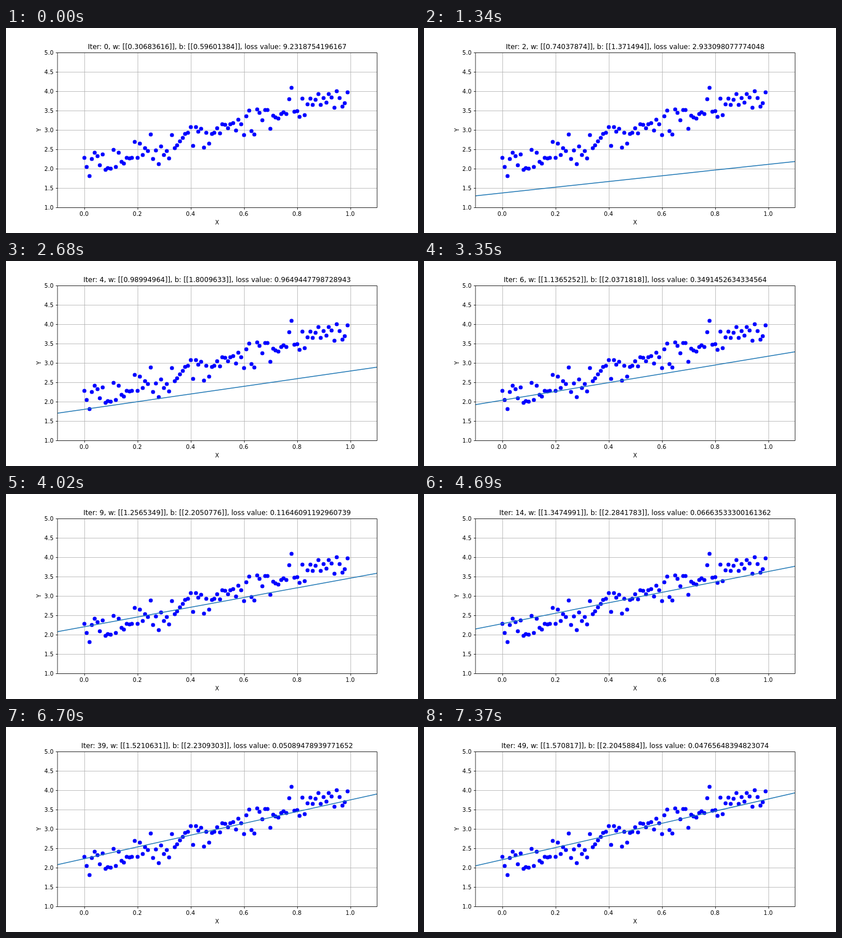
Write an HTML page that moves like this. It is 720 px wide and 360 px high and loops after 8 s.

```html
<!DOCTYPE html>
<html lang="en">
<head>
<meta charset="utf-8">
<title>Linear regression by gradient descent</title>
<style>
html, body { margin: 0; width: 100%; height: 100%; overflow: hidden; background: #fff; }
svg { display: block; }
text { font: 10px "DejaVu Sans", sans-serif; text-anchor: middle; }
#title { font-size: 12px; }
.end { text-anchor: end; }
.grid { stroke: #b0b0b0; stroke-width: .8; }
.axis { stroke: #000; stroke-width: .8; fill: none; }
#fit { stroke: #1f77b4; stroke-width: 1.5; stroke-linecap: square; }
</style>
</head>
<body>
<svg width="720" height="360" viewBox="0 0 720 360">
  <clipPath id="plot"><path d="M90 43H648V315H90Z"/></clipPath>
  <g id="grid"></g>
  <g id="dots" fill="#00f"></g>
  <g clip-path="url(#plot)"><line id="fit"/></g>
  <path class="axis" stroke-linecap="square" d="M90.5 43.5H648.5V315.5H90.5Z"/>
  <g id="ticks"></g>
  <text x="369" y="344.5">X</text>
  <text transform="translate(60.5 179) rotate(-90)">Y</text>
  <text id="title" x="369" y="37"></text>
</svg>
<script>
const STEP = 670, LOOP = 8000;

// Iteration, slope, intercept, loss before the update
const steps = [
  [0, '0.30683616', '0.59601384', '9.2318754196167'],
  [1, '0.5537114', '1.0404144', '5.191412448883057'],
  [2, '0.74037874', '1.371494', '2.933098077774048'],
  [3, '0.8820108', '1.6178778', '1.6707527637481689'],
  [4, '0.98994964', '1.8009633', '0.9649447798728943'],
  [6, '1.1365252', '2.0371818', '0.3491452634334564'],
  [9, '1.2565349', '2.2050776', '0.11646091192960739'],
  [14, '1.3474991', '2.2841783', '0.06663533300161362'],
  [19, '1.3956218', '2.2883917', '0.06077395007014275'],
  [29, '1.4640527', '2.2606804', '0.05511939898133278'],
  [39, '1.5210631', '2.2309303', '0.05089478939771652'],
  [49, '1.570817', '2.2045884', '0.04765648394823074']
];

// Screen height of each sample, x = 0, 0.01 ... 0.99
const samples = [
  228, 244, 260, 230, 219, 225, 241, 222, 249, 246,
  247, 214, 244, 219, 235, 238, 228, 229, 228, 200,
  228, 203, 223, 211, 216, 187, 230, 215, 239, 208,
  223, 216, 229, 188, 211, 206, 199, 193, 186, 184,
  174, 207, 174, 182, 177, 210, 184, 203, 186, 184,
  176, 185, 169, 170, 176, 169, 167, 180, 161, 169,
  188, 155, 145, 181, 187, 143, 149, 162, 144, 144,
  177, 154, 157, 159, 151, 148, 151, 125, 105, 147,
  146, 156, 124, 153, 134, 124, 135, 126, 116, 135,
  123, 131, 116, 122, 140, 111, 123, 138, 132, 113
];

const $ = id => document.getElementById(id);
const px = x => 90 + (x + .1) * 465;
const py = y => 315 - (y - 1) * 67.95;
const snap = v => Math.floor(v + .5 + 1e-6) + .5;

function add(parent, tag, attrs, text = '') {
  const el = document.createElementNS('http://www.w3.org/2000/svg', tag);
  for (const key in attrs) el.setAttribute(key, attrs[key]);
  el.textContent = text;
  $(parent).append(el);
}

for (let i = 0; i <= 5; i++) {
  const v = i / 5, x = snap(px(v));
  add('grid', 'path', { class: 'grid', d: `M${x} 43.5V315.5` });
  add('ticks', 'path', { class: 'axis', d: `M${x} 315.5v3.5` });
  add('ticks', 'text', { x: px(v), y: 330 }, v.toFixed(1));
}
for (let i = 2; i <= 10; i++) {
  const v = i / 2, y = snap(py(v));
  add('grid', 'path', { class: 'grid', d: `M90.5 ${y}H648.5` });
  add('ticks', 'path', { class: 'axis', d: `M90.5 ${y}h-3.5` });
  add('ticks', 'text', { class: 'end', x: 83, y: y + 3.5 }, v.toFixed(1));
}
samples.forEach((cy, i) =>
  add('dots', 'circle', { cx: Math.floor(px(i / 100) + .5 + 1e-6), cy, r: 3.5 }));

let shown = -1;
function show(n) {
  if (n === shown) return;
  shown = n;
  const [iter, w, b, loss] = steps[n];
  const at = x => py(w * x + +b);
  const ends = { x1: px(-.1), y1: at(-.1), x2: px(1.1), y2: at(1.1) };
  for (const key in ends) $('fit').setAttribute(key, ends[key]);
  $('title').textContent = `Iter: ${iter}, w: [[${w}]], b: [[${b}]], loss value: ${loss}`;
}

const start = performance.now();
function draw() {
  const t = (performance.now() - start) % LOOP;
  show(Math.min(Math.floor(t / STEP), steps.length - 1));
  requestAnimationFrame(draw);
}
draw();
</script>
</body>
</html>
```
